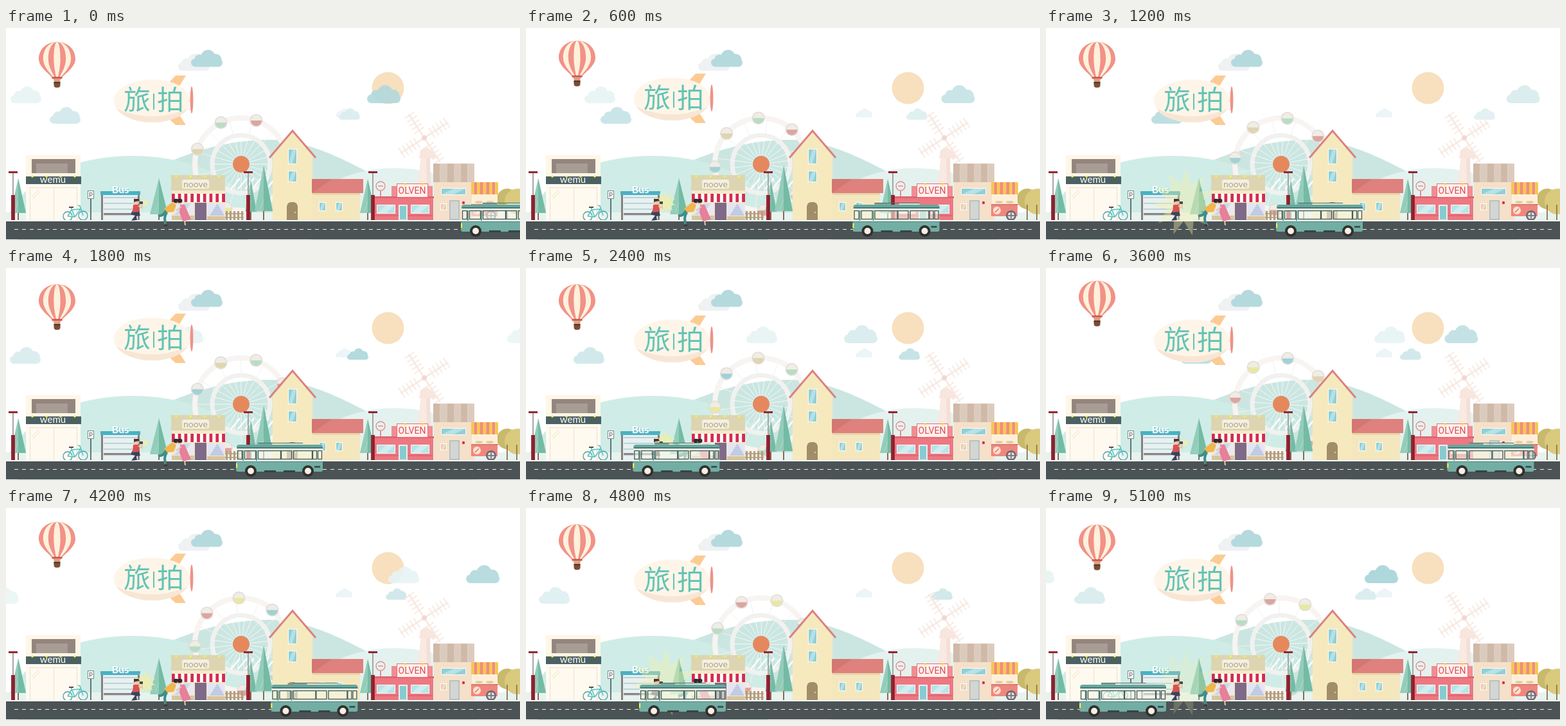
An HTML page with a canvas that plays this animation: 800 by 330 pixels, repeating every 5.4 s.

```html
<!DOCTYPE html>
<html lang="en">
<head>
<meta charset="utf-8">
<title>Seaside street</title>
<style>
html, body { margin: 0; width: 100%; height: 100%; overflow: hidden; background: #fff; }
canvas { display: block; }
</style>
</head>
<body>
<canvas id="stage" width="800" height="330"></canvas>
<script>
const g = document.getElementById('stage').getContext('2d');
const LOOP = 5400, STEP = 300, STEPS = LOOP / STEP, TAU = Math.PI * 2;

// Motion, as rules of the step s
const ramp = (s, a, b) => Math.min(1, Math.max(0, (s - a) / (b - a)));
const easeOut = u => u * (1.28 - .28 * u);
const busX = s => s < 11
  ? 708 - 350 * easeOut(ramp(s, 0, 4)) - 411 * ramp(s, 6, 10) ** 1.1
  : 708 - 656 * ramp(s, 11, 17) ** 1.15;
const balloonY = s => 22.8 + 3 * Math.cos((s - 7) * TAU / 10);
const shipY = s => 1.5 * Math.cos(s * TAU / 4) - .5;
const wheelTurn = s => 11.3 * s - 23 * ramp(s, 2, 6) + 23 * ramp(s, 10, 14);

// Each cloud drifts from x by v * age ** p while its tint goes from a to b
const drifts = [
  { start: 17, life: 16, x: -35, v: 42, p: 1, y: 91, w: 48, a: .24, b: .24 },
  { start: 5, life: 9, x: -28, v: 34, p: 1, y: 123, w: 48, a: .35, b: .8 },
  { start: 14, life: 9, x: -28, v: 24, p: 1, y: 123, w: 48, a: .2, b: .8 },
  { start: 17, life: 8, x: 496, v: 66, p: .75, y: 89, w: 52, a: .9, b: .1 },
  { start: 8, life: 9, x: 495, v: 18, p: 1.4, y: 89, w: 52, a: .4, b: 1 },
  { start: 17, life: 6, x: 481, v: 37, p: 1, y: 125, w: 33, a: .4, b: .3 },
  { start: 6, life: 6, x: 531, v: 18, p: 1.45, y: 125, w: 33, a: .85, b: .2 },
  { start: 12, life: 5, x: 551, v: 20, p: 1, y: 125, w: 33, a: .5, b: .5 }
];

function rect(x, y, w, h, c) { g.fillStyle = c; g.fillRect(x, y, w, h); }
function frame(x, y, w, h, c, t = 1) { g.strokeStyle = c; g.lineWidth = t; g.strokeRect(x + .5, y + .5, w - 1, h - 1); }
function round(x, y, w, h, r, c) { g.fillStyle = c; g.beginPath(); g.roundRect(x, y, w, h, r); g.fill(); }
function oval(x, y, rx, ry, c) { g.fillStyle = c; g.beginPath(); g.ellipse(x, y, rx, ry, 0, 0, TAU); g.fill(); }
function disc(x, y, r, c) { oval(x, y, r, r, c); }
function ring(x, y, r, c, w = 1) { g.strokeStyle = c; g.lineWidth = w; g.beginPath(); g.arc(x, y, r, 0, TAU); g.stroke(); }
function trace(p) {
  g.beginPath();
  for (let i = 0; i < p.length; i += 2) g.lineTo(p[i], p[i + 1]);
}
function poly(c, ...p) { trace(p); g.fillStyle = c; g.fill(); }
function line(c, w, ...p) { trace(p); g.strokeStyle = c; g.lineWidth = w; g.stroke(); }
function shape(c, d) { g.fillStyle = c; g.fill(new Path2D(d)); }
function text(s, x, y, font, c) { g.font = font; g.fillStyle = c; g.textAlign = 'center'; g.fillText(s, x, y); }
function stripes(x, y, w, h, n, a, b) {
  for (let i = 0; i < n; i++) rect(x + i * w / n, y, w / n, h, i % 2 ? b : a);
}
function bulbs(x, y, n, gap) {
  for (let i = 0; i < n; i++) disc(x + i * gap, y, 1.8, '#fff43a');
}
function pane(x, y, w, h, c = '#8fd0d8') {
  rect(x - 1, y - 1, w + 2, h + 2, '#fffdf4');
  rect(x, y, w, h, c);
  poly('rgba(255,255,255,.35)', x + w * .5, y, x + w, y, x + w * .5, y + h, x, y + h);
}

function cloud(x, y, w, color) {
  const h = w * .54;
  g.fillStyle = color;
  g.beginPath();
  g.roundRect(x, y + h * .52, w, h * .48, h * .24);
  for (const [cx, cy, r] of [[.27, .57, .3], [.54, .42, .42], [.78, .6, .36]]) {
    g.moveTo(x + w * cx + h * r, y + h * cy);
    g.arc(x + w * cx, y + h * cy, h * r, 0, TAU);
  }
  g.fill();
}

function sky(s) {
  disc(594.5, 93.5, 25, '#f8dfbd');
  cloud(513, 125, 26, '#edf5f9');
  g.globalAlpha = .92;
  for (const d of drifts) {
    const age = (s - d.start + STEPS) % STEPS;
    if (age >= d.life) continue;
    const k = d.a + (d.b - d.a) * age / d.life;
    const tint = [96, 47, 42].map(c => 255 - c * k);
    cloud(d.x + d.v * age ** d.p, d.y, d.w, `rgb(${tint})`);
  }
  g.globalAlpha = 1;
  cloud(268, 40, 49, '#f0f1f2');
  cloud(288, 34, 49, '#b5dadd');
}

function hills() {
  shape('#cbe6e1', 'M200 235C280 190 350 174 410 174C470 174 530 205 600 245V300H200Z');
  oval(197, 300, 187, 101, '#d0ece6');
  oval(605, 300, 140, 82, '#e4f2ef');
  rect(0, 287, 800, 12, '#e7f3ef');
}

function tree(x, top, w, bottom) {
  rect(x - 1, bottom - 5, 2, 304 - bottom, '#8a6b50');
  poly('#93cdb9', x, top, x - w, bottom, x + w, bottom);
  poly('#74bba4', x, top, x, bottom, x + w, bottom);
  line('#b5dfd0', .7, x - w * .45, bottom - 2, x, bottom - 18);
}

function lamp(x) {
  rect(x - 1, 225, 2, 36, '#a7a5a6');
  rect(x - 7, 223, 14, 3, '#8f2634');
  rect(x - 3, 260, 6, 39, '#9c2635');
  rect(x, 260, 1, 39, '#6d1b29');
}

function balloon(y) {
  g.save();
  g.translate(79.5, y);
  [1, .76, .48, .18].forEach((k, i) => {
    g.save();
    g.scale(k, 1);
    shape(i % 2 ? '#fdf1dc' : '#f29187',
      'M0 0C17 0 28.5 12 28.5 26C28.5 39 14 48 7 56H-7C-14 48 -28.5 39 -28.5 26C-28.5 12 -17 0 0 0Z');
    g.restore();
  });
  poly('#d9a585', -6, 57, 6, 57, 4, 63, -4, 63);
  rect(-8, 54, 16, 3, '#d9544f');
  round(-5, 62, 10, 9, [1, 1, 4, 4], '#7d4c33');
  rect(-5, 62, 10, 2, '#50362b');
  g.restore();
}

function airship(dy) {
  g.save();
  g.translate(0, dy);
  poly('#fccb93', 250, 88, 264, 73, 280, 73, 267, 94);
  poly('#fccb93', 250, 137, 264, 150, 280, 150, 267, 130);
  rect(281, 108, 7, 5, '#e9c6ab');
  g.save();
  g.beginPath();
  g.ellipse(227.5, 112.5, 59.5, 33.5, 0, 0, TAU);
  g.clip();
  rect(160, 75, 130, 75, '#fef5e8');
  shape('#f8e6d5', 'M166 122Q228 151 290 122V150H166Z');
  g.restore();
  oval(289, 111, 2.4, 21, '#ee9288');
  const font = '500 42px "Noto Sans CJK SC", "Noto Sans CJK", sans-serif';
  text('旅', 204, 126, font, '#64c4b5');
  text('拍', 256, 126, font, '#64c4b5');
  rect(229, 101, 2, 25, '#64c4b5');
  g.restore();
}

function wheel(turn) {
  const hues = ['#dba6a0', '#b9dcc5', '#ded5b1', '#9fd2d6', '#e8e8a4'];
  g.save();
  g.translate(366, 212);
  ring(0, 0, 72, '#f7f4f2', 8);
  ring(0, 0, 45, '#f1f1ef', 7);
  for (let i = 0; i < 24; i++) {
    const a = (turn + i * 15) * TAU / 360, c = Math.cos(a), s = Math.sin(a);
    line('rgba(255,255,255,.75)', 1, 0, 0, 43 * c, 43 * s);
    if (i % 2) line('#f4f1ef', 1, 48 * c, 48 * s, 69 * c, 69 * s);
  }
  disc(0, 0, 13, '#e5885d');
  for (let i = 0; i < 7; i++) {
    const a = (turn + 19 - 45 * i) * TAU / 360;
    const x = 72 * Math.sin(a), y = -72 * Math.cos(a);
    disc(x, y, 10, '#e1dad5');
    disc(x, y, 8.5, '#f0ece6');
    g.fillStyle = hues[i % 5];
    g.beginPath();
    g.arc(x, y, 8.5, 0, Math.PI);
    g.fill();
  }
  g.restore();
  for (let x = 350; x < 410; x += 11) line('#fff', 2.5, x, 251, x + 14, 234);
}

function windmill() {
  const c = '#f8e9e2';
  poly(c, 646, 200, 659, 200, 658, 246, 640, 246);
  poly('#f3dfd7', 654, 200, 660, 200, 661, 246, 655, 246);
  poly('#f7e5de', 643, 203, 645, 191, 653, 185, 662, 190, 674, 203);
  g.save();
  g.translate(651, 171);
  g.rotate(-.58);
  for (let i = 0; i < 4; i++) {
    line(c, 2.5, 0, 0, 44, 0);
    for (let x = 14; x < 44; x += 7) line(c, 1.8, x, -9, x, 9);
    g.rotate(TAU / 4);
  }
  disc(0, 0, 4, '#f1d8cf');
  g.restore();
}

function cornerShop() {
  rect(31, 198, 85, 33, '#fef6e7');
  rect(31, 243, 85, 56, '#fffaf0');
  rect(40, 204, 68, 22, '#93867f');
  rect(47, 211, 49, 15, '#a99c94');
  rect(31, 231, 86, 12, '#4c6164');
  text('wemu', 73, 241, '15px Lato, sans-serif', '#fff');
  bulbs(41, 231, 4, 22);
  frame(37, 248, 74, 52, '#eadfcb');
  line('#eadfcb', 1, 74.5, 248, 74.5, 299);
  line('#f1dfb9', 1, 40, 263, 50, 253);
  line('#f1dfb9', 1, 42, 266, 53, 255);
}

function busStop() {
  rect(131, 265, 2, 34, '#667477');
  rect(127, 253, 10, 13, '#fff');
  frame(127, 253, 10, 13, '#7b888a');
  text('P', 132, 263, '10px Lato, sans-serif', '#555');
  rect(150, 260, 57, 37, '#e7f1f1');
  for (let y = 263; y < 292; y += 9) rect(152, y, 53, 2, '#bed2d4');
  for (const x of [148, 205]) rect(x, 260, 3, 39, '#887e7d');
  rect(152, 288, 49, 3, '#8d8584');
  rect(147, 254, 62, 6, '#4ab1c5');
  const font = 'bold 16px Lato, sans-serif';
  text('Bus', 179, 258, font, '#65bdcb');
  text('Bus', 178, 257, font, '#fff');
}

function bicycle() {
  ring(96, 293, 7, '#4e9ca5', 1.3);
  ring(120, 292, 7, '#4e9ca5', 1.3);
  line('#59c5cc', 1.7, 96, 293, 102, 283, 116, 282, 107, 294, 96, 293);
  line('#59c5cc', 1.7, 107, 294, 101, 279);
  line('#59c5cc', 1.7, 120, 292, 115, 277, 112, 276);
  line('#544b48', 2, 98, 279, 105, 279);
}

function photographer() {
  poly('#3b435d', 197, 284, 207, 285, 209, 292, 203, 293, 204, 299, 195, 300, 201, 292, 194, 290);
  poly('#d8524f', 198, 275, 207, 275, 208, 286, 197, 287);
  line('#efc3a4', 2, 206, 277, 212, 280, 211, 273);
  disc(203, 271, 4, '#efc3a4');
  poly('#413634', 199, 271, 199, 266, 206, 266, 208, 269, 202, 270);
  rect(208, 270, 5, 4, '#4a4a50');
}

function couple() {
  line('#408c8b', 4, 250, 284, 247, 296, 248, 307);
  line('#408c8b', 4, 250, 284, 244, 291, 237, 293);
  line('#413634', 3, 246, 307, 251, 307);
  poly('#f1b64f', 246, 281, 259, 271, 265, 276, 261, 286, 251, 287);
  poly('#e6809b', 271, 275, 278, 275, 288, 298, 275, 301, 270, 287);
  line('#efc3a4', 2, 278, 300, 279, 307);
  line('#efc3a4', 2, 273, 278, 264, 284);
  for (const x of [264, 270]) {
    disc(x, 271, 3.5, '#efc3a4');
    oval(x + .5, 269, 4, 3.2, '#302a2c');
  }
}

function cafe() {
  rect(258, 251, 83, 48, '#f5e9cb');
  rect(257, 229, 84, 24, '#ddd5b2');
  round(274, 236, 42, 14, 3, '#f5f0dd');
  text('noove', 295, 248, '14px Lato, sans-serif', '#aaa18f');
  bulbs(265, 231, 4, 22.3);
  stripes(258, 258, 83, 13, 17, '#d62b50', '#fff');
  rect(262, 273, 30, 18, '#e9eaf0');
  poly('#cdd9e9', 262, 291, 276, 273, 288, 273, 274, 291);
  rect(258, 292, 35, 7, '#d8c5a0');
  rect(294, 272, 18, 27, '#7f6b87');
  rect(313, 273, 27, 19, '#e4e5f2');
  poly('#c0cce4', 317, 292, 329, 273, 340, 292);
  rect(313, 293, 28, 6, '#d8c5a0');
  for (const y of [288, 294]) rect(341, y, 29, 2, '#c3a987');
  for (let x = 342; x < 370; x += 6) rect(x, 285, 3, 14, '#b89c7c');
}

function house() {
  poly('#f6e9be', 415, 300, 415, 199, 446, 162, 477, 199, 477, 300);
  line('#dc817d', 3, 410, 202, 446, 160, 482, 202);
  pane(440, 189, 12, 22);
  pane(440, 223, 12, 16);
  round(437, 271, 17, 29, [7, 7, 0, 0], '#a18d69');
  disc(450, 287, 1, '#f6e9be');
  rect(477, 256, 74, 44, '#f5e7bd');
  rect(477, 257, 74, 3, '#e5d6ab');
  rect(476, 235, 80, 22, '#df827d');
  poly('#d47772', 476, 235, 508, 235, 476, 257);
  for (const x of [488, 514]) pane(x, 272, 9, 12);
}

function diner() {
  ring(583, 246, 7, '#e78d8e', 1.4);
  line('#e78d8e', 1.5, 579, 246, 587, 246);
  rect(582, 253, 2, 9, '#e78d8e');
  rect(600, 246, 64, 16, '#f18d92');
  rect(571, 262, 94, 37, '#ee7882');
  rect(569, 262, 97, 3, '#dd6772');
  rect(608, 242, 49, 22, '#fff0ed');
  frame(608, 242, 49, 22, '#e77178');
  text('OLVEN', 632, 258, '14px Roboto, sans-serif', '#dc4e56');
  bulbs(621, 244, 2, 27);
  for (const x of [578, 631]) {
    pane(x, 276, 27, 12, '#b6e4ea');
    rect(x - 6, 291, 39, 2, '#dd6772');
  }
  rect(611, 275, 14, 25, '#e5f2f1');
  rect(613, 277, 10, 21, '#87cbd1');
}

function market() {
  rect(666, 238, 63, 61, '#f5e0c9');
  stripes(665, 211, 64, 29, 6, '#cfb9a8', '#dccbbd');
  pane(678, 250, 37, 9);
  rect(690, 268, 16, 31, '#bac0c0');
  rect(692, 270, 12, 27, '#d3d7d4');
  pane(677, 274, 8, 9, '#e4cbb2');
  disc(712, 272, 2.2, '#d52e43');
}

function stall() {
  disc(780, 266, 16, '#c8b96e');
  disc(796, 270, 20, '#d9ca7e');
  for (const x of [779, 794]) rect(x, 275, 2, 24, '#9b8052');
  rect(725, 259, 40, 17, '#fdf0d8');
  for (const x of [736, 753]) oval(x, 271, 6, 2, '#e5c9a3');
  stripes(724, 240, 42, 19, 9, '#f6c84f', '#f18a7d');
  rect(724, 276, 41, 17, '#f0877f');
  rect(724, 274, 42, 2, '#d97a70');
  disc(733, 284, 6, '#fbe2cc');
  line('#e0726e', 1.5, 730, 287, 736, 281);
  disc(755, 292, 8, '#6b6770');
  disc(755, 292, 5.5, '#dfdada');
  line('#6b6770', 1.5, 749, 292, 761, 292);
  line('#6b6770', 1.5, 755, 286, 755, 298);
}

function flash(s) {
  const age = s % 6, r = 6 + 46 * ramp(age, 0, 4) ** 2, n = 11;
  g.globalAlpha = Math.min(.85, 1.1 - .18 * age);
  g.fillStyle = '#f5efa4';
  g.beginPath();
  for (let i = 0; i < n * 2; i++) {
    const k = i % 2 ? r * .55 : r, t = i * Math.PI / n + .2;
    g.lineTo(216 + k * Math.cos(t), 272 + k * Math.sin(t));
  }
  g.fill();
  g.globalAlpha = 1;
}

function bus(x) {
  const dark = '#415957', cream = '#f6f6e9';
  g.save();
  g.translate(x, 0);
  rect(34, 272, 22, 3, '#79aaa3');
  rect(72, 272, 32, 3, '#dce8df');
  line('#4b6a69', 1, 34, 272.5, 104, 272.5);
  round(1, 275, 134, 6, [4, 4, 0, 0], '#69a69d');
  rect(2, 279, 133, 2, '#437a75');
  rect(1, 281, 134, 3, cream);
  rect(1, 298, 134, 4, cream);
  rect(1, 284, 134, 14, 'rgba(245,248,232,.6)');
  for (const [a, w] of [[2, 8], [13, 18], [34, 36], [70, 17], [89, 30], [119, 7], [127, 7]]) frame(a, 284, w, 14, dark, 1.3);
  for (const a of [10, 31]) rect(a, 284, 2, 16, '#5f928b');
  round(0, 301, 135, 16, [1, 1, 3, 3], '#72aea4');
  rect(0, 301, 135, 1, '#4d8580');
  rect(0, 304, 2, 7, '#fff34a');
  for (const a of [44, 74]) rect(a, 315, 18, 3, '#354343');
  rect(122, 308, 9, 3, '#3e5554');
  for (const cx of [23, 112]) {
    disc(cx, 316, 9, '#322f30');
    disc(cx, 316, 5, '#f7f1e4');
  }
  g.restore();
}

function road() {
  rect(0, 299, 800, 2, '#f8fafa');
  rect(0, 301, 800, 28, '#4b5355');
  for (let x = 13; x < 785; x += 12) rect(x, 313, 6, 1, '#f4f4f0');
}

function draw(s) {
  rect(0, 0, 800, 330, '#fff');
  sky(s);
  balloon(balloonY(s));
  airship(shipY(s));
  hills();
  wheel(wheelTurn(s));
  windmill();
  tree(19, 234, 12, 288);
  lamp(11);
  cornerShop();
  busStop();
  bicycle();
  tree(238, 234, 14, 290);
  cafe();
  tree(381, 237, 9, 286);
  tree(401, 214, 14, 285);
  lamp(377);
  house();
  tree(563, 235, 12, 288);
  diner();
  lamp(571);
  market();
  stall();
  road();
  flash(s);
  photographer();
  couple();
  bus(busX(s));
}

const start = performance.now();
function tick() {
  draw(Math.floor((performance.now() - start) % LOOP / STEP));
  requestAnimationFrame(tick);
}
tick();
</script>
</body>
</html>
```
